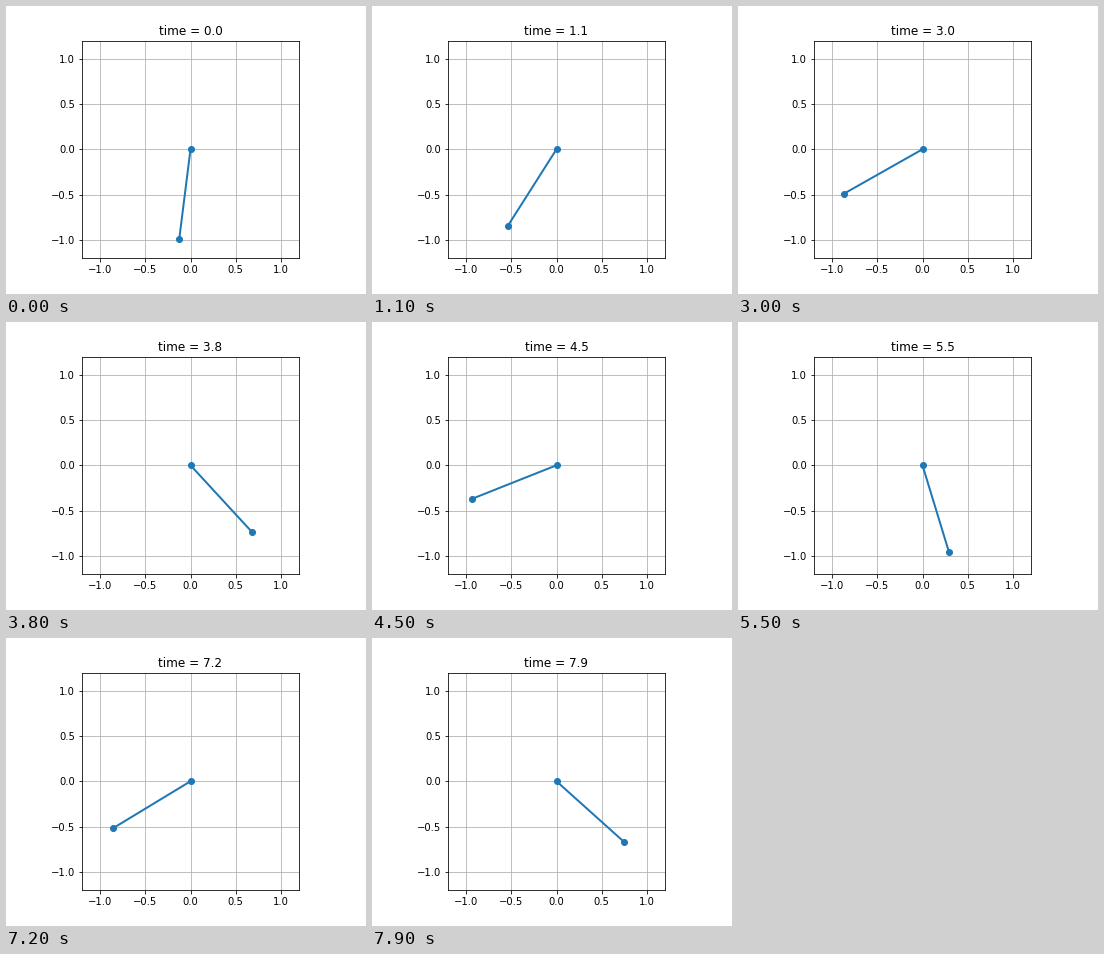
A matplotlib script for the animation above (8 s loop, 360 px wide and 288 px high).

```python
import numpy as np
import matplotlib.pyplot as plt
from matplotlib.animation import FuncAnimation

FRAMES, STEP = 80, 0.1

# Times of the leftmost swings; the period drifts a little.
LEFT_TURNS = [-1.49, 0.615, 2.667, 4.767, 6.85, 8.93]


def angle(t):
    """Angle from straight down, positive to the right."""
    phase = 2 * np.pi * np.interp(t, LEFT_TURNS, range(len(LEFT_TURNS)))
    swing = 1.12 + 0.0034 * (t - 3.7) ** 2
    return (-0.386 - swing * np.cos(phase)
            + 0.076 * np.cos(2 * phase) + 0.03 * np.cos(3 * phase))


plt.rcParams.update({"font.family": "DejaVu Sans", "font.size": 10})
fig = plt.figure(figsize=(5, 4), dpi=72, facecolor="white")
fig.subplots_adjust(left=0.125, right=0.9, bottom=0.125, top=0.88)
ax = fig.add_subplot(aspect="equal", xlim=(-1.2, 1.2), ylim=(-1.2, 1.2))
ticks = np.linspace(-1, 1, 5)
ax.set_xticks(ticks)
ax.set_yticks(ticks)
ax.grid(color="#b0b0b0", linewidth=0.8)

rod, = ax.plot([], [], "o-", color="#1f77b4", lw=2, ms=6)
title = ax.set_title("", fontsize=12)


def update(i):
    t = i * STEP
    a = angle(t)
    rod.set_data([0, np.sin(a)], [0, -np.cos(a)])
    title.set_text(f"time = {t:.1f}")
    return rod, title


anim = FuncAnimation(fig, update, frames=FRAMES, interval=1000 * STEP,
                     repeat=True, repeat_delay=0, blit=False)
plt.show()
```
